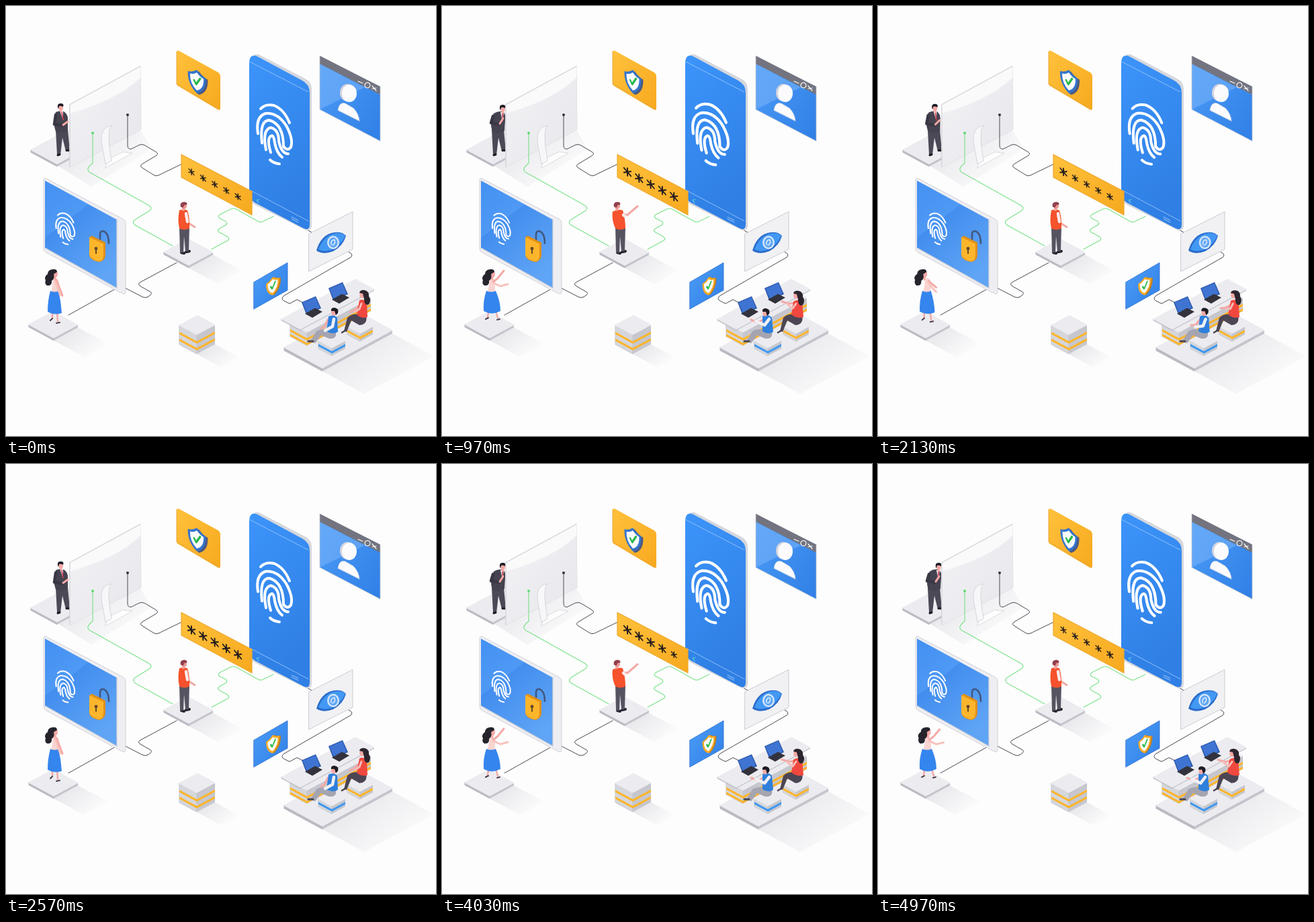
Animation of 640x640 px, one loop 5.01 s. Source, as an HTML page:

```html
<!DOCTYPE html>
<html lang="en">
<head>
<meta charset="utf-8">
<title>Secure access</title>
<style>
html,body{margin:0;width:100%;height:100%;overflow:hidden;background:#fdfdfd}
svg{display:block;width:100vw;height:100vh}
</style>
</head>
<body>
<svg id="stage" viewBox="0 0 640 640" stroke-linecap="round" stroke-linejoin="round"></svg>
<script>
const LOOP = 5010, CYCLE = 3200, BEAT = 1600, SLOPE = .54;
const PALE = '#ececf0', SIDE = '#b9bac1', EDGE = '#cfd0d6', SKIN = '#f4a9a6',
  GOLD = '#fdb52b', INK = '#33323c', HAIR = '#1d1c24', GREEN = '#7fe28c', WIRE = '#4b4b55';

const fill = (d, c, more = '') => `<path d="${d}" fill="${c}" ${more}/>`;
const line = (d, c, w = 1, more = '') => `<path d="${d}" fill="none" stroke="${c}" stroke-width="${w}" ${more}/>`;
const group = (id, body) => `<g id="${id}">${body}</g>`;
const disc = (x, y, r, c) => `<circle cx="${x}" cy="${y}" r="${r}" fill="${c}"/>`;
const oval = (x, y, rx, ry, c) => `<ellipse cx="${x}" cy="${y}" rx="${rx}" ry="${ry}" fill="${c}"/>`;
const poly = (...pts) => 'M' + pts.map(p => p.join()).join('L') + 'Z';
const grad = (id, a, b, x2 = 1, y2 = 1) =>
  `<linearGradient id="${id}" x2="${x2}" y2="${y2}"><stop stop-color="${a}"/><stop offset="1" stop-color="${b}"/></linearGradient>`;

// Isometric block: left corner, run up-right, run down-right, height.
function corners(x, y, a, b) {
  return [[x, y], [x + a, y - a * SLOPE], [x + a + b, y + (b - a) * SLOPE], [x + b, y + b * SLOPE]];
}
const drop = ([x, y], h) => [x, y + h];
function block(x, y, a, b, h, stripes = [], color = GOLD) {
  const [l, t, r, f] = corners(x, y, a, b);
  const bands = stripes.map(o =>
    fill(poly(drop(l, o), drop(f, o), drop(r, o), drop(r, o + 3.5), drop(f, o + 3.5), drop(l, o + 3.5)), color)).join('');
  return fill(poly(l, f, drop(f, h), drop(l, h)), stripes.length ? '#d5d6db' : SIDE, `stroke="${SIDE}" stroke-width=".6"`) +
    fill(poly(f, r, drop(r, h), drop(f, h)), stripes.length ? '#c6c7ce' : '#c4c5cc') + bands +
    fill(poly(l, t, r, f), PALE, `stroke="${PALE}"`);
}
function shadow(x, y, a, b, h, len) {
  const [, , r, f] = corners(x, y + h, a, b), move = ([px, py]) => [px + len, py + len * SLOPE];
  return fill(poly(f, r, move(r), move(f)), 'url(#shade)');
}

const ridges = [
  'M-21 -37Q-14 -45 -1 -42Q14 -36 22 -16',
  'M-25 0Q-29 -25 -14 -30Q4 -32 17 -12Q28 8 24 20Q19 27 13 19Q13 -14 -8 -20Q-23 -20 -19 14',
  'M-13 24Q-19 -6 -6 -9Q6 -6 6 11Q10 30 20 30',
  'M-6 28Q-13 5 -4 3Q-1 4 0 14Q3 29 11 35',
  'M-7 39Q-2 44 7 45'
].join('');
const print = (id, w) => group(id, line(ridges, '#fff', w));

const shieldShape = 'M0 -17Q7 -10 13 -10Q14 9 0 18Q-14 9 -13 -10Q-7 -10 0 -17Z';
const shield = (id, rim, back) => group(id,
  fill(shieldShape, back, 'transform="translate(3 1)"') + fill(shieldShape, rim) +
  fill(shieldShape, '#fbfbfb', 'transform="scale(.76)"') + line('M-4 0L-1 5L5 -6', '#27b84a', 2.8));

const stars = [0, 1, 2, 3, 4].map(i =>
  group('star' + i, line('M0 -5V5M-4.5 -4L4.5 4M-4.5 2L4.5 -2', '#231c1e', 1.7))).join('');

function laptop(x, y) {
  return `<g transform="translate(${x} ${y})">` + fill('M0 6L21 -3L29 15L7 24Z', '#2a55a8') +
    fill('M1.5 6.5L20.5 -1.5L27 14L8 22Z', '#3f74d2') + fill('M5 23L20 14.5L31 20L16 29Z', INK) + '</g>';
}

// Tweened parts: id -> [[time, shape], ...], repeating every CYCLE.
const parts = {};
function poses(id, rest, active) {
  parts[id] = [[0, rest], [100, rest], [780, active], [1720, active], [2420, rest], [CYCLE, rest]];
}
function shape(id, rest, active, style) {
  poses(id, rest, active);
  return `<path id="${id}" d="${rest}" ${style}/>`;
}
const solid = c => `fill="${c}"`;
const limb = (c, w) => `fill="none" stroke="${c}" stroke-width="${w}"`;
const shift = (x, y = 0) => `translate(${x},${y})`;

function suitMan() {
  poses('suitHead', shift(0), shift(9, 2));
  return fill('M74 184L76 221L81 222L84 196L89 216L95 216L92 184Z', '#4a4955') +
    line('M77 222L80 221M90 215H94', '#1b1a22', 3) +
    shape('suitCoat', 'M74,158 Q80,155 86,157 Q92,161 92,168 L92,186 Q84,190 74,187 Q69,172 74,158Z',
      'M77,160 Q84,155 92,158 Q95,162 94,170 L93,186 Q84,191 75,187 Q70,173 77,160Z', solid('#454350')) +
    shape('suitShirt', 'M80,156 L85,156 L85,170Z', 'M87,158 L92,158 L90,172Z', solid('#f4eef2')) +
    shape('suitTie', 'M83,158 L85,169', 'M90,160 L90,171', limb('#d23a4c', 1.6)) +
    shape('suitArm', 'M74,162 L72,176 L84,178', 'M76,164 L73,174 L84,176', limb('#393744', 4.5)) +
    shape('suitHand', 'M85,177 L92,172', 'M86,175 L91,167', limb(SKIN, 3)) +
    group('suitHead', line('M81 153L82 157', SKIN, 3) + oval(81.5, 151, 3.5, 5, SKIN) +
      fill('M77 151Q76 145 81 145Q87 145 85 150Q81 148 79 149L78 153Z', HAIR));
}

function woman() {
  const arm = (id, low, out, up) =>
    parts[id] = [[0, low], [130, out], [800, up], [1700, up], [2400, low], [CYCLE, low]];
  arm('armBack', 'M75,408 L79,418 L84,431', 'M75,408 L78,420 L87,421', 'M76,411 L83,405 L92,394');
  arm('armFront', 'M73,409 L77,420 L81,431', 'M73,409 L76,421 L86,422', 'M76,412 L87,417 L98,414');
  parts.girlHead = [[0, shift(0)], [450, shift(-6)], [850, shift(2)], [1720, shift(2)], [2080, shift(-4)], [2420, shift(0)], [CYCLE, shift(0)]];
  return shape('girlLegs', 'M69,456 L69,465 M76,456 L77,469', 'M69,456 L68,463 M80,454 L83,464', limb(SKIN, 2.5)) +
    shape('girlShoes', 'M66,468 L69,465 M75,472 L80,471', 'M65,466 L69,464 M82,467 L86,466', limb('#494050', 2)) +
    shape('girlTop', 'M69,405 Q77,402 79,412 L78,427 L67,426 Q70,415 69,405Z', 'M70,406 Q77,403 79,412 L79,427 L67,426 Q71,415 70,406Z', solid('#f9d5d2')) +
    shape('girlSkirt', 'M66,424 Q73,427 78,424 Q82,440 83,457 Q72,461 62,455 Q62,438 66,424Z',
      'M66,424 Q73,427 80,424 Q87,440 87,454 Q74,461 62,454 Q61,438 66,424Z', solid('#3585ee')) +
    line('', SKIN, 3, 'id="armBack"') + line('', '#f8c3bd', 3, 'id="armFront"') +
    group('girlHead', oval(73, 399, 4, 5.5, SKIN) + line('M72 402L73 407', SKIN, 3) +
      fill('M76 396Q76 391 69 392Q62 393 62 399Q56 403 59 408Q57 413 61 416Q69 417 68 409Q73 406 71 399Z', '#25232c'));
}

function vestMan() {
  const low = 'M269,309 L270,322 L281,329', cuff = 'M268,309 L270,321', tucked = 'M270,311 L272,313';
  const up = 'M268,310 L276,311 L291,298';
  const calm = 'M258,304 Q264,302 270,304 Q274,317 273,331 Q265,335 258,331 Q255,318 258,304Z';
  const bent = 'M254,306 Q262,302 269,304 Q273,317 273,331 Q265,335 258,331 Q252,318 254,306Z';
  parts.vestArm = [[0, low], [130, 'M269,310 L275,323 L289,323'], [700, up], [1300, up],
    [1670, 'M269,309 L271,322 L273,338'], [1770, low], [CYCLE, low]];
  parts.vestSleeve = [[0, cuff], [130, tucked], [1300, tucked], [1670, 'M269,309 L271,325'], [1770, cuff], [CYCLE, cuff]];
  parts.vestHead = [[0, shift(0)], [130, shift(3)], [700, shift(-4)], [1300, shift(-4)], [1670, shift(3)], [1770, shift(0)], [CYCLE, shift(0)]];
  parts.vest = [[0, calm], [130, calm], [700, bent], [1300, bent], [1670, calm], [CYCLE, calm]];
  return line('M261 367L265 368M268 366L273 365', '#25252f', 4) +
    fill('M258 329H273L272 365H267L265 343L264 367H259Z', '#565361') +
    line('', SKIN, 3, 'id="vestArm"') + fill('', '#f5522d', 'id="vest"') +
    line('', '#fbeaea', 4.5, 'id="vestSleeve"') +
    group('vestHead', line('M264 299V303', SKIN, 4) + oval(265, 297.5, 4, 5, '#ea9994') +
      fill('M260 299Q258 292 265 291.5Q271 292 269 296Q265 295 264 300Z', '#91414d'));
}

function deskWoman() {
  poses('redHead', shift(0), shift(-3, 1));
  return block(508, 477, 19, 19, 12, [5]) +
    shape('redArm', 'M526,446 L519,452 L512,456', 'M525,442 L517,443 L506,440', limb(SKIN, 3)) +
    fill('M536 461Q539 474 526 475L514 468L507 485L503 484L508 464Q515 457 528 459Z', '#4c4554') +
    line('M505 483L500 486', '#494050', 2.5) +
    shape('redTop', 'M526,438 Q532,435 537,440 L538,463 Q528,466 522,459Z', 'M523,440 Q530,435 536,440 L538,463 Q528,466 520,459Z', solid('#f0483f')) +
    shape('redSleeve', 'M529,443 L526,451 L520,455', 'M527,443 L522,450 L514,444', limb('#f4bfba', 3)) +
    group('redHead', oval(530, 430, 3.8, 5, SKIN) +
      fill('M526 427Q527 422 534 423Q541 425 540 432Q544 437 540 444Q533 447 533 436L531 428Z', '#2c252d'));
}

function deskMan() {
  poses('blueHead', shift(0), shift(-7, 1));
  return block(465, 498, 20, 20, 12, [5], '#3f98f0') +
    fill('M491 485Q493 496 481 495L469 490L460 502L453 499L462 484Q470 479 482 482Z', '#a5a5b1') +
    line('M457 499L450 499', '#4a4653', 3) +
    shape('blueReach', 'M479,467 L474,477 L469,480', 'M478,467 L470,471 L460,467', limb(SKIN, 3)) +
    shape('blueVest', 'M480,462 Q488,458 493,464 L494,485 Q485,490 477,484Z', 'M477,462 Q485,457 491,464 L493,485 Q485,490 477,484Z', solid('#2f7fdc')) +
    shape('blueSleeve', 'M488,466 L486,477 L475,483', 'M487,466 L480,475 L467,469', limb('#f0f0f4', 4.5)) +
    group('blueHead', oval(488, 456, 3.8, 5, SKIN) +
      fill('M484 454Q483 449 489 449Q496 450 494 457L491 460L489 454Z', HAIR));
}

const defs = '<defs>' + grad('shade', '#e3e3e8', '#fdfdfd', 1, .7) + grad('sky', '#4d9df8', '#2f7fe6') +
  grad('deep', '#3c94fa', '#2f7fe4', .3) + grad('amber', '#ffc13c', '#f7a91f') +
  grad('glow', '#2f7eea', '#5fa4f5', .6) + grad('back', '#f3f3f6', '#e6e6eb') + '</defs>';

const shadows = fill('M76 237L96 225L200 185L217 213L127 269Z', 'url(#shade)') +
  shadow(34, 474, 36, 37, 4, 45) + shadow(235, 366, 36, 37, 4, 44) +
  shadow(258, 475, 27, 26, 29, 36) + shadow(414, 508, 104, 57, 5, 62);

const wires =
  line('M448 333L457 338M93 460L161 422M178 420L203 433Q207 435 211 433L214 431Q219 427 214 425L200 417Q195 414 200 411L254 382', WIRE) +
  line('M510 366Q518 370 513 374L414 431Q408 436 414 439L422 443L433 437L441 441', WIRE) +
  line('M306 362L330 349Q334 346 329 343L318 337Q313 334 318 331L327 326Q331 323 326 320L318 316Q314 313 319 310L335 302Q338 301 342 302L376 321Q379 322 382 321L398 313', GREEN, 1.2);

const computer = fill('M95 146L200 89L201 184L95 240Z', 'url(#back)', 'stroke="#dddde3" stroke-width=".8"') +
  fill('M95 147L200 90V107Q165 140 95 160Z', '#fafafb') + line('M95 147L200 90', EDGE, .8) + line('M95 147V239', EDGE) +
  fill('M148 241L188 219L174 217L152 228Z', '#fdfdfd', 'stroke="#d3d4da" stroke-width=".8"') +
  fill('M148 235L142 202Q140 180 157 178Q151 184 154 210L157 230Z', '#f7f7f9', 'stroke="#cccdd4" stroke-width=".8"') +
  line('M181 162V208Q181 213 186 213L198 207Q202 205 206 207L223 217Q228 220 223 223L203 235Q198 238 203 241L219 251Q223 254 227 252L262 235', WIRE) +
  line('M129 189V234Q121 240 122 244Q122 247 129 250L213 297Q219 301 213 305L192 318Q187 322 192 326L248 357', GREEN, 1.2) +
  disc(181, 162, 2, INK) + disc(129, 189, 2, '#63d874');

const wideScreen = fill('M56 259Q56 255 60 257L174 317Q178 319 178 323V425Q178 430 173 428L60 367Q56 365 56 361Z', '#eeeef2', 'stroke="#c7c8cf" stroke-width=".8"') +
  fill('M58 260L165 318V420L58 360Z', 'url(#glow)') + fill('M58 260L123 295L58 345Z', '#5ea6fa', 'opacity=".45"') +
  line('M165 318V420L58 360', EDGE, 1.4) + print('printSmall', 3.8) +
  line('M140 352V339Q141 333 147 336Q153 340 153 353', '#41587f', 2.6) +
  fill('M124 344L128 342L148 352V370Q148 378 140 381Q124 379 124 369Z', '#e08f18') +
  fill('M124 344L145 354V372Q144 381 137 380Q124 376 124 369Z', GOLD) +
  disc(134, 361, 2.4, '#66492b') + line('M134 362V368', '#66492b', 2);

const phone = fill('M366 76Q370 71 376 72L445 108Q455 113 455 124V328Q454 335 447 334L371 296Q362 291 362 283Z', '#d6d7dd') +
  fill('M362 86Q362 70 374 75L441 111Q452 117 452 129V325Q452 335 443 331L371 293Q362 288 362 279Z', 'url(#deep)') +
  line('M363 83L450 128M363 274L450 320', '#a5cdfa', .8) +
  line('M377 288L373 289L376 293', '#5cd0dd', 1.2) + line('M425 314L435 319M425 317L435 322', '#9fcbfa') + print('printBig', 4);

const browser = fill('M467 75L557 120V201L467 154Z', 'url(#sky)') + fill('M467 86L534 121L467 154Z', '#7fb8fb', 'opacity=".5"') +
  fill('M467 74L557 120V132L467 86Z', '#73747f') + line('M467 75V154L557 201V120', '#c6c8d0', .8) +
  line('M524 112L531 115M545 119L551 126M551 122L545 123', '#fff', 1.2) + line('M538 114A4 4 0 1 1 537.9 114', '#fff', 1.2) +
  oval(508, 129, 11, 13, '#d3d4dc') + oval(511, 130, 11, 13, '#fbfbfd') +
  fill('M494 155Q496 142 505 145L517 152Q525 160 526 171Z', '#fbfbfd', 'stroke="#d3d4dc" stroke-width=".7"');

const cards = fill('M254 69Q254 65 258 67L316 99Q319 101 319 104V152Q319 156 315 154L256 119Q254 118 254 115Z', 'url(#amber)') +
  line('M254 68V116L318 154', '#e7a636') + shield('shieldTop', '#3474cc', '#4c5a82') +
  fill('M261 221L366 276V311L261 255Z', 'url(#amber)', 'stroke="#eda92f" stroke-width="1.2"') + stars;

const eyeCard = fill('M451 339L516 306V362L451 395Z', '#f1f1f4', 'stroke="#cacbd2" stroke-width="1"') +
  fill('M462 364Q468 343 484 338Q499 334 506 342Q502 357 487 365Q472 371 462 364Z', '#2b6ccb') +
  fill('M465 362Q472 344 487 339Q499 336 505 342Q499 356 484 363Q472 367 465 362Z', '#4298f3') +
  group('iris', oval(486, 352, 9, 10, '#d3e5fa') + oval(486, 352, 6.5, 7.5, '#60a7f4') +
    line('M483 355Q482 348 488 348Q490 354 485 356', '#e1edfa', 1.5)) +
  fill('M369 411L419 382V423L369 451Z', 'url(#sky)', 'stroke="#2b6ccb" stroke-width=".8"') + shield('shieldLow', '#f9ab25', '#bf8024');

const office = block(414, 508, 104, 57, 5) + block(423, 472, 95, 25, 20, [9, 16]) + block(410, 466, 110, 28, 2) +
  laptop(440, 435) + laptop(480, 414) + deskWoman() + deskMan();

const $ = id => document.getElementById(id);
$('stage').innerHTML = defs + shadows + block(37, 214, 75, 39, 4) + wires + suitMan() + computer +
  phone + cards + browser + wideScreen + block(34, 474, 36, 37, 4) + woman() +
  block(235, 366, 36, 37, 4) + vestMan() + block(258, 475, 27, 26, 29, [10, 20]) + eyeCard + office;

const ease = v => { v = Math.max(0, Math.min(1, v)); return v * v * (3 - 2 * v); };
const number = /-?\d+(\.\d+)?/g;
function tween(stops, t) {
  const i = Math.max(1, stops.findIndex(s => s[0] > t));
  const [t0, a] = stops[i - 1], [t1, b] = stops[i], k = ease((t - t0) / (t1 - t0)), to = b.match(number);
  let n = 0;
  return a.replace(number, v => (+v + (to[n++] - v) * k).toFixed(2));
}
const place = (id, x, y, slope, sx, sy) =>
  $(id).setAttribute('transform', `translate(${x} ${y}) matrix(1 ${slope} 0 1 0 0) scale(${sx} ${sy})`);

function draw(time) {
  const t = time % CYCLE;
  for (const id in parts) $(id).setAttribute(id.endsWith('Head') ? 'transform' : 'd', tween(parts[id], t));
  const swell = ease((t - 100) / 750) - ease((t - 1680) / 750);
  place('printBig', 400, 190, 0, 1 + .04 * swell, 1 + .03 * swell);
  place('printSmall', 88.5, 331, 0, .55 - .02 * swell, .53 - .01 * swell);
  place('shieldTop', 284, 112, .42, 1.02 - .06 * swell, 1);
  place('shieldLow', 397, 416.5, -.45, .76 - .04 * swell, .78);
  $('iris').setAttribute('transform', shift(1 - swell));
  // Each star swells once per beat, a little after its neighbour.
  for (let i = 0; i < 5; i++) {
    const pulse = u => ease((u - 430 - 100 * i) / 150) * (1 - ease((u - 1260 - 100 * i) / 170));
    const u = time % BEAT;
    const size = Math.max(pulse(u), time >= BEAT ? pulse(u + BEAT) : 0);
    place('star' + i, 276 + 17.3 * i, 247 + 9.2 * i, .3, .85 + .3 * size, .85 + .3 * size);
  }
}
const start = performance.now();
function tick() {
  draw((performance.now() - start) % LOOP);
  requestAnimationFrame(tick);
}
tick();
</script>
</body>
</html>
```
